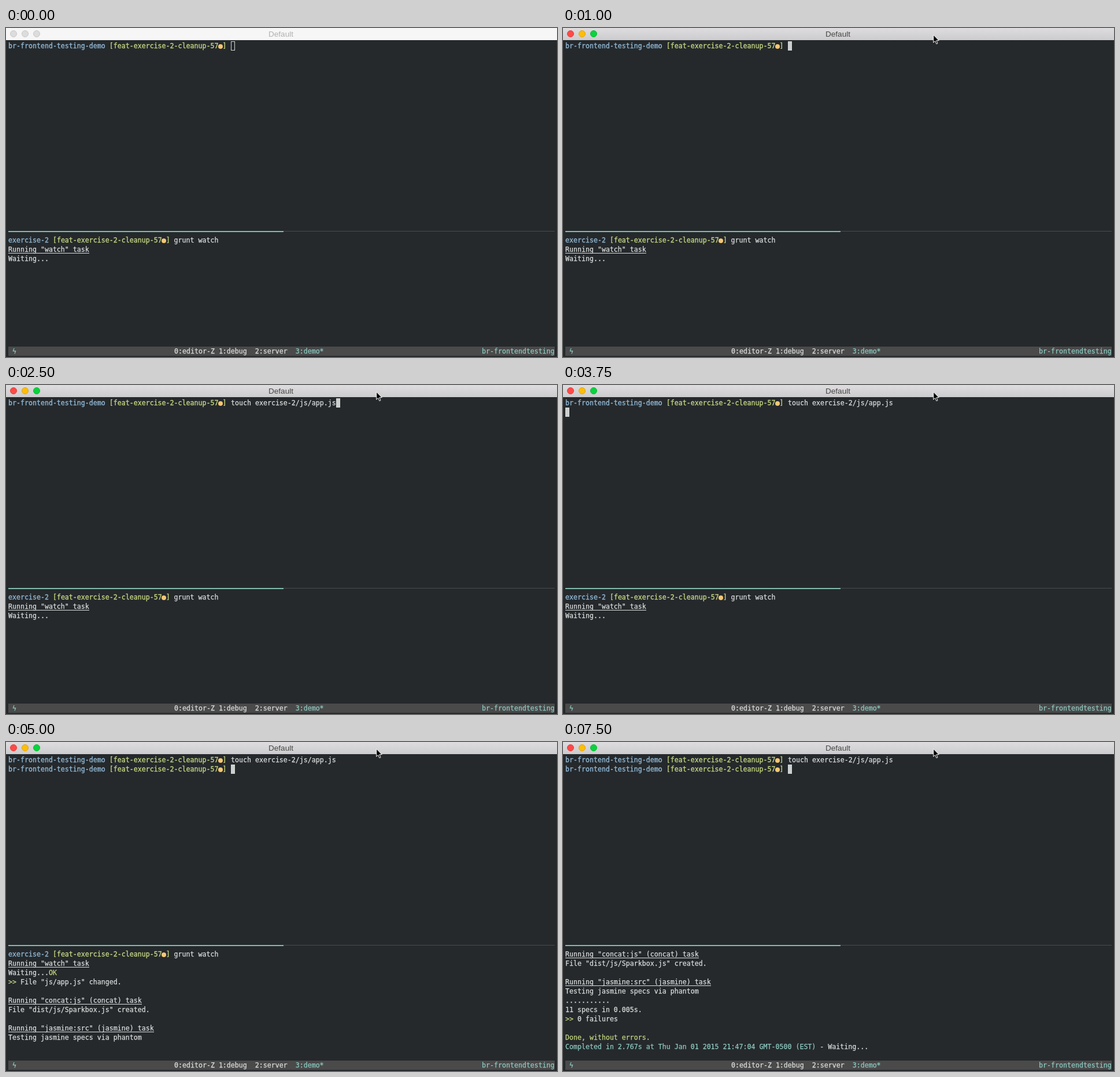
Recreate the animation shown at these times as an HTML page. Size 953 by 569 pixels, loop 8000 ms.

```html
<!DOCTYPE html>
<html lang="en">
<head>
<meta charset="utf-8">
<title>Terminal</title>
<style>
  html, body { margin: 0; width: 100%; height: 100%; overflow: hidden; background: #25292c; }

  .stage {
    --fg: #dcdedd; --blue: #92b9d6; --green: #c3d680; --teal: #8ecac2; --dot: #f6c674;
    position: relative; width: 953px; height: 569px; overflow: hidden;
    background: #25292c; color: var(--fg);
  }
  .stage * { box-sizing: border-box; }
  .abs, pre, .bar, .bar i, .title, .cursor, .pointer, .pane, .rule, .status { position: absolute; }

  /* All motion is made of hard steps on one shared clock */
  .anim { animation: 8s step-end infinite; }

  /* Title bar */
  .bar { left: 0; top: 0; width: 953px; height: 21px; background: #f6f6f6; color: #b0b0b0; }
  .bar i { top: 4px; width: 12px; height: 12px; border-radius: 50%; background: #dcdcdc; border: 1px solid #c8c8c8; }
  .bar i:nth-child(1) { left: 7px; }
  .bar i:nth-child(2) { left: 27px; }
  .bar i:nth-child(3) { left: 47px; }
  .title { left: 0; top: 0; width: 951px; font: 13.5px/21px "Liberation Sans", Arial, sans-serif; text-align: center; }
  .active { background: linear-gradient(#dedcde, #cccbcd); color: #464646; animation-name: focus; }
  .active i:nth-child(1) { background: #fd4a48; border-color: #e33f3d; }
  .active i:nth-child(2) { background: #fdbd0a; border-color: #e2a508; }
  .active i:nth-child(3) { background: #09d33e; border-color: #0bb934; }

  /* Text grid: 7 by 16 pixel cells */
  pre {
    margin: 0; left: 4px; font: 11.627px/16px "DejaVu Sans Mono", Menlo, monospace;
    -webkit-text-stroke: .25px currentColor;
  }
  u { display: inline-block; text-decoration: none; background: linear-gradient(var(--fg), var(--fg)) 0 14px / 100% 1px no-repeat; }
  .blue { color: var(--blue); }
  .green { color: var(--green); }
  .teal { color: var(--teal); }
  .blue, .branch { -webkit-text-stroke-width: .35px; }
  .branch { color: var(--green); }
  .branch b { display: inline-block; position: relative; width: 7px; height: 16px; vertical-align: top; }
  .branch b::before {
    content: ""; position: absolute; left: -.5px; top: 5px; width: 8px; height: 8px;
    border-radius: 50%; background: var(--dot);
  }

  .typed { left: 389px; top: 23px; overflow: hidden; animation-name: type; }
  .reply { top: 39px; animation-name: reply; }
  .cursor { left: 0; top: 23px; width: 7px; height: 16px; border: 1px solid #d2d5d4; animation-name: cursor; }

  .rule { left: 4px; top: 351px; width: 945px; height: 1px; background: #484d4f; }
  .rule::before { content: ""; display: block; width: 476px; height: 2px; margin-top: -.5px; background: #80bcae; }

  .pane { left: 0; top: 359px; width: 953px; height: 192px; overflow: hidden; }
  .log { left: 0; top: 0; animation-name: scroll; }
  .changed { animation-name: changed; }
  .testing { animation-name: testing; }
  .done { animation-name: done; }

  .status { left: 4px; top: 551px; width: 945px; height: 16px; background: #4a4a4a; }
  .status pre { top: 0; }

  .pointer { left: 0; top: 0; width: 14px; height: 19px; overflow: visible; animation-name: pointer; }

  @keyframes focus { 0% { opacity: 0 } 12.5%, 100% { opacity: 1 } }
  @keyframes reply { 0% { opacity: 0 } 50%, 100% { opacity: 1 } }
  @keyframes changed { 0% { opacity: 0 } 53.125%, 100% { opacity: 1 } }
  @keyframes testing { 0% { opacity: 0 } 62.5%, 100% { opacity: 1 } }
  @keyframes done { 0% { opacity: 0 } 87.5%, 100% { opacity: 1 } }
  @keyframes scroll { 0% { transform: none } 87.5%, 100% { transform: translateY(-80px) } }
  @keyframes type {
    0% { width: 0 }
    18.75% { width: 7px }
    21.875% { width: 28px }
    25% { width: 42px }
    31.25%, 100% { width: 184px }
  }
  @keyframes cursor {
    0% { transform: translate(389px, 0); background: transparent }
    12.5% { transform: translate(389px, 0); background: #cbcfce }
    18.75% { transform: translate(396px, 0); background: #cbcfce }
    21.875% { transform: translate(417px, 0); background: #cbcfce }
    25% { transform: translate(431px, 0); background: #cbcfce }
    31.25% { transform: translate(571px, 0); background: #cbcfce }
    46.875% { transform: translate(4px, 16px); background: #cbcfce }
    50%, 100% { transform: translate(389px, 16px); background: #cbcfce }
  }
  @keyframes pointer {
    0% { transform: translate(640px, -30px) }
    3.125% { transform: translate(640px, -12px) }
    6.25% { transform: translate(640.5px, 8px) }
    9.375%, 100% { transform: translate(640px, 11px) }
  }
</style>
</head>
<body>
<div class="stage">
  <div class="bar"><i></i><i></i><i></i><div class="title">Default</div></div>
  <div class="bar active anim"><i></i><i></i><i></i><div class="title">Default</div></div>

  <pre style="top:23px"><span class="blue">br-frontend-testing-demo</span> <span class="branch">[feat-exercise-2-cleanup-57<b></b>]</span></pre>
  <pre class="typed anim">touch exercise-2/js/app.js</pre>
  <pre class="reply anim"><span class="blue">br-frontend-testing-demo</span> <span class="branch">[feat-exercise-2-cleanup-57<b></b>]</span></pre>
  <div class="cursor anim"></div>

  <div class="rule"></div>

  <div class="pane">
    <div class="abs log anim">
      <pre><span class="blue">exercise-2</span> <span class="branch">[feat-exercise-2-cleanup-57<b></b>]</span> grunt watch
<u>Running "watch" task</u>
Waiting...<span class="changed anim"><span class="green">OK</span>
<span class="green">&gt;&gt;</span> File "js/app.js" changed.</span>

<span class="testing anim"><u>Running "concat:js" (concat) task</u>
File "dist/js/Sparkbox.js" created.

<u>Running "jasmine:src" (jasmine) task</u>
Testing jasmine specs via phantom</span>
<span class="done anim">...........
11 specs in 0.005s.
<span class="green">&gt;&gt;</span> 0 failures

<span class="green">Done, without errors.</span>
<span class="teal">Completed in 2.767s at Thu Jan 01 2015 21:47:04 GMT-0500 (EST)</span> - Waiting...</span></pre>
    </div>
  </div>

  <div class="status">
    <pre class="teal" style="left:7px">ϟ</pre>
    <pre style="left:287px">0:editor-Z 1:debug  2:server  <span class="teal">3:demo*</span></pre>
    <pre class="teal" style="left:819px">br-frontendtesting</pre>
  </div>

  <svg class="pointer anim" viewBox="0 0 14 19">
    <path d="M.7 1V14.2L3.7 11.4L5.8 16.5L8 15.6L5.9 10.7H10.2Z" fill="#000" stroke="#fff" stroke-width="1"/>
  </svg>
</div>
</body>
</html>
```
